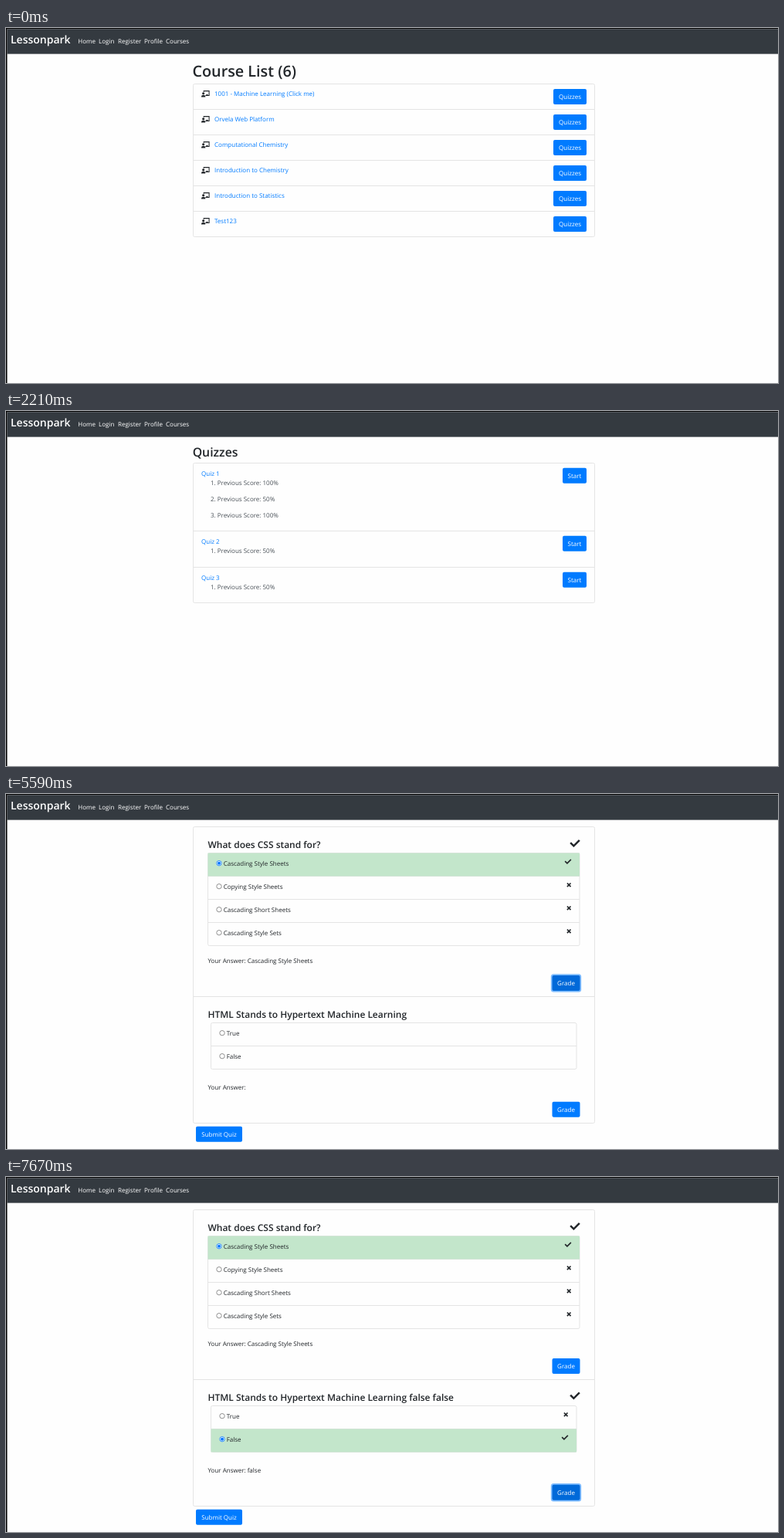
Animation, 1000 px wide and 460 px high, one loop 8 s. Source, as an HTML page:

```html
<!DOCTYPE html>
<html lang="en">
<head>
<meta charset="utf-8">
<title>Course quizzes</title>
<style>
  html, body { margin: 0; width: 100%; height: 100%; overflow: hidden; background: #fefefe; }
  svg { display: block; width: 1000px; height: 460px; }
  text { font: 8px "Open Sans", "Noto Sans", sans-serif; fill: #212529; text-rendering: geometricPrecision; white-space: pre; }
  .head { font-weight: 600; }
  .link { fill: #007bff; }
  .soft { fill: #495057; }
  .light { fill: #fff; }
  .mid { text-anchor: middle; }
  .line { fill: none; stroke: #e4e4e4; }
</style>
</head>
<body>
<svg id="stage" viewBox="0 0 1000 460"></svg>
<script>
const LOOP = 8000;
const INK = '#212529';
const COURSES = ['1001 - Machine Learning (Click me)', 'Orvela Web Platform', 'Computational Chemistry',
  'Introduction to Chemistry', 'Introduction to Statistics', 'Test123'];
const QUIZZES = [
  { top: 67.5, scores: [100, 50, 100] },
  { top: 155.5, scores: [50] },
  { top: 202.5, scores: [50] }
];
const STYLES = ['Cascading Style Sheets', 'Copying Style Sheets', 'Cascading Short Sheets', 'Cascading Style Sets'];

// Each step changes part of the state; hover and focus hold a button id.
const STEPS = [
  [0, { page: 'courses', row: -1, hover: '', focus: '' }],
  [520, { row: 4 }],
  [650, { row: 3 }],
  [780, { row: 2 }],
  [910, { row: 1 }],
  [1040, { row: 0 }],
  [1300, { hover: 'course0' }],
  [1690, { focus: 'course0' }],
  [1820, { page: 'quizzes', hover: '', focus: '' }],
  [2730, { hover: 'start2' }],
  [2860, { focus: 'start2' }],
  [3250, { page: 'quiz', hover: '', focus: '' }],
  [4420, { picked1: true }],
  [5330, { hover: 'grade1' }],
  [5460, { focus: 'grade1' }],
  [5590, { graded1: true }],
  [6500, { hover: '' }],
  [6630, { focus: '', picked2: true }],
  [7150, { hover: 'grade2' }],
  [7280, { focus: 'grade2' }],
  [7410, { graded2: true }]
];

const text = (x, y, s, cls = '', size = 8) =>
  `<text x="${x}" y="${y}" class="${cls}" style="font-size:${size}px">${s}</text>`;
const question = (y, s) => text(261.5, y, s, 'head', 11.97);
const rect = (x, y, w, h, fill, r = 0) =>
  `<rect x="${x}" y="${y}" width="${w}" height="${h}" rx="${r}" fill="${fill}"/>`;

// Bordered list; ys holds the top edge, the dividers and the bottom edge.
function list(x1, x2, ys) {
  const end = ys[ys.length - 1];
  const dividers = ys.slice(1, -1).map(y => `M${x1} ${y}H${x2}`).join('');
  return `<rect class="line" x="${x1}" y="${ys[0]}" width="${x2 - x1}" height="${end - ys[0]}" rx="2"/>` +
    `<path class="line" d="${dividers}"/>`;
}

function button(st, id, x, y, w, label, h = 20) {
  const ring = st.focus === id ? rect(x - 1.7, y - 1.7, w + 3.4, h + 3.4, '#80bdff', 3.5) : '';
  return ring + rect(x, y, w, h, st.hover === id ? '#0069d9' : '#007bff', 2) +
    text(x + w / 2, y + h / 2 + 3.1, label, 'light mid');
}

const check = (cx, cy, size) =>
  `<path transform="translate(${cx - size / 2} ${cy - size / 2}) scale(${size / 512})"
    d="M26 219L192 385L486 91" fill="none" stroke="${INK}" stroke-width="98"/>`;
const cross = (cx, cy) =>
  `<path d="M${cx - 2.3} ${cy - 2.3}l4.6 4.6m0 -4.6l-4.6 4.6" stroke="${INK}" stroke-width="1.7"/>`;

const teacher = (x, y) =>
  `<g transform="translate(${x} ${y}) scale(.0166)" fill="${INK}">
    <circle cx="160" cy="224" r="96"/>
    <path d="M0 512v-50q5-110 110-110h100q105 0 110 110v50z"/>
    <path d="M192 96V32H608V384H320" fill="none" stroke="${INK}" stroke-width="64"/>
    <rect x="384" y="288" width="128" height="80"/></g>`;

function radio(x, y, on) {
  const color = on ? '#0075ff' : '#767676';
  return `<circle cx="${x}" cy="${y}" r="3.2" fill="#fff" stroke="${color}" stroke-width=".8"/>` +
    (on ? `<circle cx="${x}" cy="${y}" r="2" fill="${color}"/>` : '');
}

function navbar() {
  const links = { Home: 93.3, Login: 120, Register: 145, Profile: 179, Courses: 207 };
  return rect(0, 0, 1000, 1.3, '#000') + rect(0, 0, 1.5, 460, '#000') + rect(1.5, 1.3, 998.5, 32.3, '#343a40') +
    text(6, 20, 'Lessonpark', 'head light', 14) +
    Object.entries(links).map(([s, x]) => text(x, 19.5, s, 'light')).join('');
}

// Answer rows with the right one marked once graded.
function answers(x1, x2, top, names, right, picked, graded) {
  const ys = [...names, 0].map((_, i) => top + 30 * i);
  const fill = graded ? rect(x1, ys[right], x2 - x1, 30, '#c3e6cb') : '';
  return list(x1, x2, ys) + fill + names.map((name, i) => {
    const y = ys[i] + 13.2;
    const mark = !graded ? '' : i === right ? check(x2 - 15, y - 2, 8.6) : cross(x2 - 13.8, y - 1.9);
    return radio(x1 + 14.5, y, picked && i === right) + text(x1 + 20.2, y + 3.1, name) + mark;
  }).join('');
}

const PAGES = {
  courses: st =>
    text(241.5, 63.3, `Course List (${COURSES.length})`, 'head', 19.8) +
    (st.row < 0 ? '' : rect(242.5, 72.5 + 33 * st.row, 520, 33, '#f7f8fa')) +
    list(242.5, 762.5, [...COURSES, 0].map((_, i) => 72.5 + 33 * i)) +
    COURSES.map((name, i) => {
      const y = 72.5 + 33 * i;
      return teacher(253, y + 8.6) + text(270, y + 15.7, name, 'link') +
        button(st, 'course' + i, 709, y + 6.5, 43, 'Quizzes');
    }).join(''),

  quizzes: st =>
    text(241.7, 59.3, 'Quizzes', 'head', 15.8) +
    list(242.5, 762.5, [...QUIZZES.map(q => q.top), 248.5]) +
    QUIZZES.map((q, i) =>
      text(253, q.top + 16, `Quiz ${i + 1}`, 'link') +
      q.scores.map((score, n) =>
        text(265, q.top + 28.7 + 21 * n, `${n + 1}. Previous Score: ${score}%`, 'soft')).join('') +
      button(st, 'start' + i, 721, q.top + 6.2, 31, 'Start')
    ).join(''),

  quiz: st =>
    list(242.5, 762.5, [42.5, 262.5, 426.5]) +
    question(70.3, 'What does CSS stand for?') +
    answers(261.5, 743, 76.5, STYLES, 0, st.picked1, st.graded1) +
    text(261.5, 219, 'Your Answer: ' + (st.graded1 ? STYLES[0] : '')) +
    button(st, 'grade1', 707.5, 235, 36, 'Grade') +
    (st.graded1 ? check(737, 64, 13) : '') +
    question(290, 'HTML Stands to Hypertext Machine Learning' + (st.graded2 ? ' false false' : '')) +
    answers(265.5, 739, 296.5, ['True', 'False'], 1, st.picked2, st.graded2) +
    text(261.5, 382.8, 'Your Answer: ' + (st.graded2 ? 'false' : '')) +
    button(st, 'grade2', 707.5, 398.8, 36, 'Grade') +
    (st.graded2 ? check(737, 283.5, 13) : '') +
    button(st, 'submit', 246, 430.8, 60, 'Submit Quiz')
};

const stage = document.getElementById('stage');
let shown = 0;

function draw() {
  const t = performance.now() % LOOP;
  const past = STEPS.filter(([start]) => start <= t);
  if (past.length !== shown) {
    shown = past.length;
    const st = Object.assign({}, ...past.map(step => step[1]));
    stage.innerHTML = rect(0, 0, 1000, 460, '#fefefe') + navbar() + PAGES[st.page](st);
  }
  requestAnimationFrame(draw);
}
draw();
</script>
</body>
</html>
```
